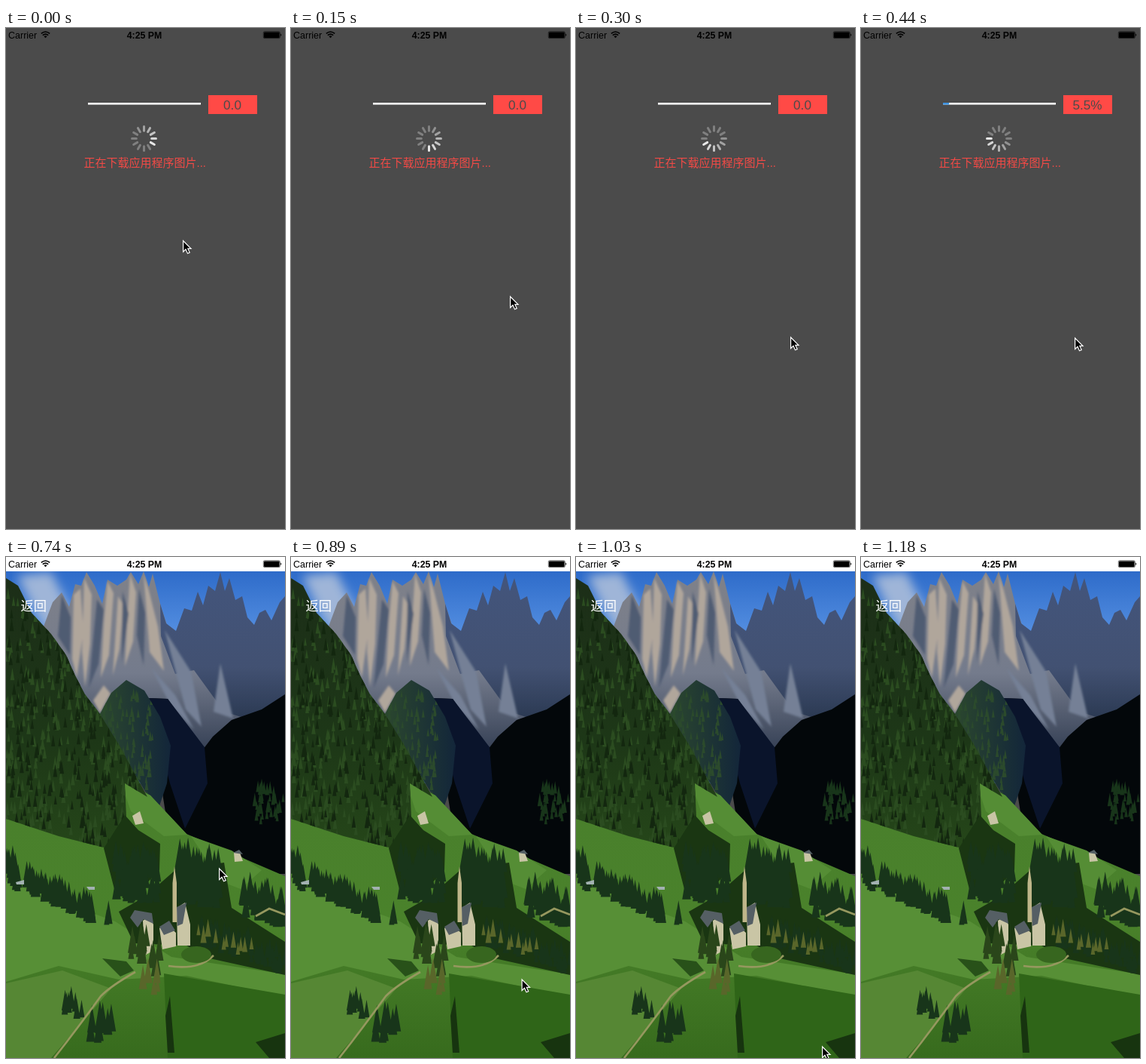
Write an HTML page that moves like this. It is 371 px wide and 664 px high and loops after 1.58 s.

```html
<!DOCTYPE html>
<html lang="zh-CN">
<head>
<meta charset="utf-8">
<style>
html, body { margin: 0; width: 100%; height: 100%; overflow: hidden; background: #4b4b4b; }
svg { display: block; }
text { font-family: "Liberation Sans", Arial, "Noto Sans CJK SC", "Noto Sans CJK", sans-serif; }
</style>
</head>
<body>
<svg width="371" height="664" viewBox="0 0 371 664">
  <defs>
    <linearGradient id="sky" x2="0" y2="1"><stop stop-color="#2563c4"/><stop offset=".4" stop-color="#5d97e6"/></linearGradient>
    <linearGradient id="rock" x2="0" y2="1"><stop stop-color="#7f8189"/><stop offset=".55" stop-color="#747b8c"/><stop offset="1" stop-color="#303b50"/></linearGradient>
    <linearGradient id="shade" x2="0" y2="1"><stop stop-color="#43557c"/><stop offset=".6" stop-color="#425172"/><stop offset="1" stop-color="#26344b"/></linearGradient>
    <linearGradient id="meadow" x2="0" y2="1"><stop stop-color="#497f2c"/><stop offset=".5" stop-color="#4a822b"/><stop offset="1" stop-color="#376b1d"/></linearGradient>
    <linearGradient id="wood" x2="0" y2="1"><stop stop-color="#1c2e18"/><stop offset=".6" stop-color="#1d3717"/><stop offset="1" stop-color="#254619"/></linearGradient>
    <linearGradient id="knollFill"><stop stop-color="#2b472e"/><stop offset="1" stop-color="#13263a"/></linearGradient>
    <filter id="soft"><feGaussianBlur stdDeviation="7"/></filter>
    <filter id="haze"><feGaussianBlur stdDeviation="1.5"/></filter>
    <clipPath id="slope"><path id="hill" d="M0 28L16 38L34 74L60 102L80 130L91 155L105 182L125 208L152 252L188 318L158 300L160 345L134 386L70 370L0 347Z"/></clipPath>
    <clipPath id="knoll"><path id="dome" d="M125 208L140 180L160 163L184 177L205 212L219 250L214 300L204 330L186 312L155 262Z"/></clipPath>
  </defs>

  <g id="loading">
    <rect width="371" height="664" fill="#4b4b4b"/>
    <rect x="109" y="99" width="150" height="2.6" fill="#fff"/>
    <rect id="bar" x="109" y="99" height="2.6" fill="#3f93df"/>
    <rect x="269" y="89" width="65" height="25" fill="#ff4a46"/>
    <text id="percent" x="301" y="107.7" font-size="17.2" text-anchor="middle" fill="#4b4b4b"></text>
    <g id="spinner" transform="translate(183.5 146.5)" stroke-width="3" stroke-linecap="round"></g>
    <text x="103.5" y="184" font-size="15" fill="#f24a46">正在下载应用程序图片...</text>
  </g>

  <g id="photo">
    <rect width="371" height="300" fill="url(#sky)"/>
    <path d="M15 25L60 20L85 70L70 120L40 75Z" fill="#9fb5d8" filter="url(#soft)"/>
    <path d="M50 92L62 60L74 47L84 66L92 36L100 38L107 20L118 38L128 62L135 30L148 38L160 30L166 20L176 36L183 19L190 40L195 22L205 62L214 90L226 100L290 100L371 160V230L262 265L120 215Z" fill="url(#rock)"/>
    <path d="M205 62L213 88L226 98L237 68L247 71L255 46L262 64L269 38L278 45L285 20L291 45L297 28L305 57L314 52L321 80L330 90L337 74L345 70L353 84L364 60L371 52V230L290 205L250 150L225 155L206 105Z" fill="url(#shade)"/>
    <g filter="url(#haze)">
      <path d="M90 50L99 42L103 98L94 160L88 135ZM104 28L114 50L112 115L105 172L101 125ZM135 32L143 48L137 130L126 160L130 88ZM165 22L173 47L169 112L158 145L162 70ZM183 23L190 45L202 92L210 151L191 126ZM149 52L156 63L151 122L142 157ZM116 190L130 170L139 181L125 207Z" fill="#b0a69b"/>
      <path d="M211 97L246 152L260 225L239 202ZM285 141L302 214L276 205ZM194 148L225 183L250 229L218 195Z" fill="#748096"/>
      <path d="M74 50L86 80L85 130L69 105ZM121 56L130 70L123 142L110 174ZM155 45L163 75L154 140ZM177 42L185 74L183 144L174 104Z" fill="#505b72"/>
    </g>
    <path d="M188 187L215 188L262 255L275 238L300 216L340 202L371 182V420H225Z" fill="#03070a"/>
    <path d="M188 187L215 188L264 252L268 300L238 360L218 300Z" fill="#0a142b"/>
    <use href="#dome" fill="url(#knollFill)"/>
    <g clip-path="url(#knoll)"><path data-trees="125,185,70,0,140,120,15" fill="#2b4a2c"/></g>

    <path d="M0 345L130 370L152 294L192 316L240 367L371 423V664H0Z" fill="url(#meadow)"/>
    <path d="M152 296L192 316L241 368L210 370L166 337ZM246 370L300 389L340 415L312 440L286 430Z" fill="#558d35"/>
    <path d="M0 430L145 483L220 530L371 553V583L240 555L150 560L70 542L0 563Z" fill="#578f36"/>
    <path d="M0 565L75 548L140 572L60 664H0Z" fill="#568734"/>
    <path d="M210 552L371 580V664H215Z" fill="#2f6518"/>
    <use href="#hill" fill="url(#wood)"/>
    <g clip-path="url(#slope)">
      <path data-trees="0,55,190,0,340,420,18" fill="#2b4c20"/>
      <path data-trees="0,55,190,0,340,320,18" fill="#13270f"/>
    </g>
    <path d="M130 386L158 342L176 362L205 380L204 415L165 455L144 440ZM150 470L185 450L225 415L290 405L300 465L371 510V554L271 532L240 515L170 512Z" fill="#1a3612"/>
    <path d="M128 532L160 536L170 548L152 556Z" fill="#285119"/>
    <g fill="#18351a">
      <path data-trees="0,405,18,20,22,22,34"/>
      <path data-trees="27,432,90,42,14,65,36"/>
      <path data-trees="146,405,56,5,52,75,36"/>
      <path data-trees="227,412,56,5,50,80,43"/>
      <path data-trees="314,450,58,14,30,55,40"/>
      <path data-trees="256,490,115,40,25,65,26"/>
      <path data-trees="330,310,41,0,45,35,18"/>
      <path data-trees="112,630,30,-10,18,10,44"/>
      <path data-trees="132,486,5,0,2,2,32"/>
      <path data-trees="72,590,34,14,14,10,28"/>
    </g>
    <path d="M215 657L212 608L218 582L224 657ZM332 643L371 631V664H350Z" fill="#17340f"/>
    <path d="M64 664Q95 625 126 582Q140 568 172 550M216 542Q257 548 276 528M332 476L350 466L371 474" fill="none" stroke="#96985f" stroke-width="2.6"/>
    <ellipse cx="253" cy="527" rx="20" ry="11" fill="#37661f"/>
    <path d="M182 482L190 476L196 487V522L184 528ZM204 492L213 486L226 498V516L208 520ZM227 465L238 458L245 487V515H228ZM168 343L178 337L183 353L172 355ZM303 392L310 389L315 403L304 404Z" fill="#c9c5a5"/>
    <path d="M221.5 484V432L224 410L227 432V484Z" fill="#bfb68a"/>
    <path d="M165 478L171 468L194 472L196 486L183 480L175 491ZM204 490L217 482L225 495L210 501ZM227 464L240 458L235 486L228 489ZM302 392L310 388L315 394Z" fill="#555f64"/>
    <path data-trees="166,515,42,0,42,20,38" fill="#2a461a"/>
    <g fill="#59662a"><path data-trees="182,556,20,0,26,7,36"/><path data-trees="254,490,80,25,20,12,24"/></g>
    <path d="M13 431L24 428V434H14ZM107 437H118V441H110Z" fill="#a2b1b1"/>
    <rect width="371" height="19" fill="#fff"/>
    <text x="19.5" y="70.5" font-size="17.3" fill="#fff">返回</text>
  </g>

  <g>
    <text x="3" y="13.7" font-size="12.5">Carrier</text>
    <text x="184" y="13.7" font-size="12.3" font-weight="bold" text-anchor="middle">4:25 PM</text>
    <path d="M46.8 7.4Q52.5 2.6 58.2 7.4M48.8 9.6Q52.5 6.5 56.2 9.6" fill="none" stroke="#000" stroke-width="1.6"/>
    <path d="M50.4 11Q52.5 9.3 54.6 11L52.5 13.3Z"/>
    <rect x="342.3" y="4.8" width="22" height="8.8" rx="1.6" fill="none" stroke="#000" stroke-width=".6"/>
    <rect x="343" y="5.5" width="20.6" height="7.4" rx="1"/>
    <path d="M365.2 7.5Q367.4 9.2 365.2 11Z"/>
  </g>
  <path id="cursor" d="M.6 1V15.5L4 12.3L6.5 17.8L9.2 16.6L6.8 11.3H11Z" stroke="#fff" stroke-width="1.2"/>
</svg>
<script>
const $ = id => document.getElementById(id);
const LOOP = 1580, PHOTO_AT = 590, PROGRESS_AT = 440;

// The screen refreshes in steps: time, cursor x, cursor y
const steps = [
  [0, 235, 281], [150, 291, 355], [300, 285, 409], [440, 284, 410], [590, 284, 410],
  [740, 283, 412], [890, 306.5, 559], [1030, 327, 648], [1180, 340, 700]
];

let seed = 7;
const random = () => (seed = seed * 16807 % 2147483647) / 2147483647;

// Each grove: left, base, width, slope, depth, count, height
for (const grove of document.querySelectorAll("[data-trees]")) {
  const [x, y, width, slope, depth, count, height] = grove.dataset.trees.split(",").map(Number);
  let d = "";
  for (let i = 0; i < count; i++) {
    const u = random(), h = height * (.6 + .4 * random()), w = h * .17;
    const px = x + u * width, py = y + u * slope + random() * depth;
    d += `M${px - w} ${py}L${px} ${py - h}L${px + w} ${py}Z`;
  }
  grove.setAttribute("d", d);
}

const spokes = Array.from({ length: 12 }, (_, hour) => {
  const line = document.createElementNS("http://www.w3.org/2000/svg", "path");
  line.setAttribute("d", "M0 -10.2V-16");
  line.setAttribute("transform", `rotate(${hour * 30})`);
  return $("spinner").appendChild(line);
});

function draw(now) {
  const t = now % LOOP;
  const [shownAt, x, y] = steps.findLast(step => step[0] <= t);
  const progress = t < PROGRESS_AT ? 0 : 5.5;
  $("photo").style.display = t < PHOTO_AT ? "none" : "";
  $("loading").style.display = t < PHOTO_AT ? "" : "none";
  $("bar").setAttribute("width", 150 * progress / 100);
  $("percent").textContent = progress ? progress + "%" : "0.0";
  $("cursor").setAttribute("transform", `translate(${x} ${y})`);

  // One turn per second, with six lit spokes fading behind the lead
  const lead = Math.floor(4.5 + shownAt * 12 / 1000);
  spokes.forEach((spoke, hour) => {
    const age = (lead - hour + 12) % 12;
    const grey = Math.max(128, 232 - age * 17.5);
    spoke.setAttribute("stroke", `rgb(${grey},${grey},${grey})`);
  });
}

const start = performance.now();
function tick() {
  draw(performance.now() - start);
  requestAnimationFrame(tick);
}
tick();
</script>
</body>
</html>
```
